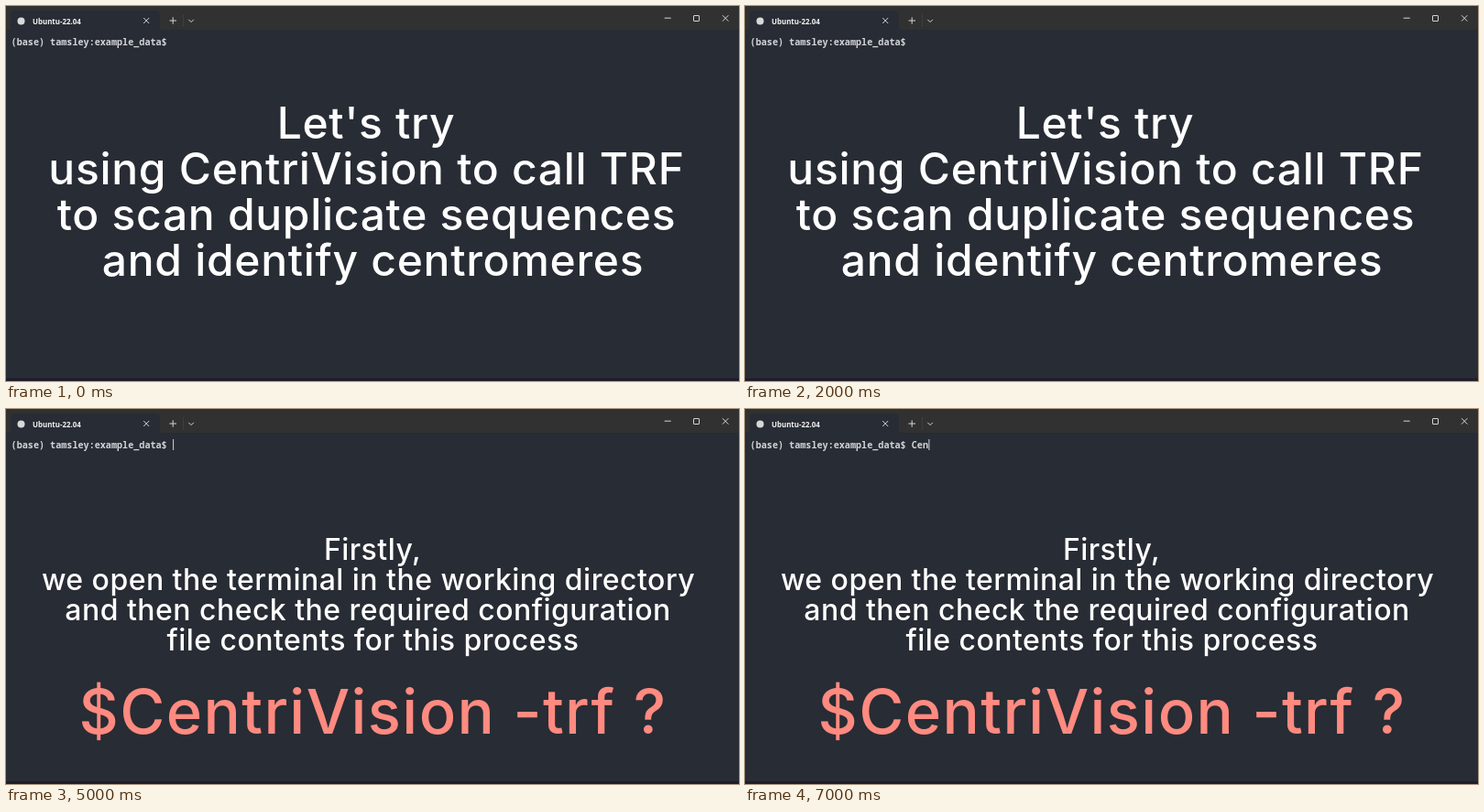
Animation of 800x410 px, one loop 8000 ms. Source, as an HTML page:

```html
<!DOCTYPE html>
<html lang="en">
<head>
<meta charset="utf-8">
<title>Terminal walkthrough</title>
<style>
  html, body { margin: 0; width: 100%; height: 100%; overflow: hidden; background: #282c34; }
  svg { display: block; width: 100%; height: 100%; }
  .caption {
    font-family: Inter, sans-serif;
    font-weight: 500;
    letter-spacing: .0145em;
    text-anchor: middle;
    fill: #fff;
  }
  .shell { font: 600 10.15px "Noto Sans Mono", monospace; fill: #d2d4d8; white-space: pre; }
  .tab { font: 700 7.9px "Open Sans", sans-serif; fill: #f2f2f2; }
  .icons { fill: none; stroke: #d4d4d4; stroke-width: 1; }
</style>
</head>
<body>
<svg viewBox="0 0 800 410" xmlns="http://www.w3.org/2000/svg">
  <rect width="800" height="410" fill="#282c34"/>
  <rect y="407" width="800" height="3" fill="#211d2c"/>
  <rect width="800" height="26" fill="#313131"/>
  <path d="M2 26Q5 26 5 23V10Q5 5 10 5H163Q168 5 168 10V23Q168 26 171 26Z" fill="#282c34"/>
  <circle cx="16.5" cy="16.5" r="4" fill="#d8d8d8"/>
  <text class="tab" x="29" y="19.6">Ubuntu-22.04</text>
  <g class="icons">
    <path d="M150.2 13l6 6m0-6l-6 6"/>
    <path d="M178.5 16h7.5M182.2 12.3v7.4"/>
    <path d="M193.5 9v14" stroke="#3e3e3e"/>
    <path d="M199.3 14.8l2.8 2.8 2.8-2.8"/>
    <path d="M718.7 13.2h7"/>
    <rect x="750.5" y="10.5" width="6" height="6" rx=".5"/>
    <path d="M782 10.2l6.4 6.4m0-6.4l-6.4 6.4"/>
  </g>
  <text id="line" class="shell" x="5.6" y="42.6"></text>
  <rect id="cursor" y="33" width="1" height="12" fill="#d2d4d8"/>
  <g id="intro" class="caption" font-size="48"></g>
  <g id="step" class="caption" font-size="32"></g>
</svg>
<script>
const $ = id => document.getElementById(id);
const LOOP = 8000, CELL = 6.09;
const PROMPT = "(base) tamsley:example_data$ ";

function addLine(group, text, x, y, style = {}) {
  const el = document.createElementNS("http://www.w3.org/2000/svg", "text");
  el.setAttribute("x", x);
  el.setAttribute("y", y);
  el.textContent = text;
  Object.assign(el.style, style);
  group.append(el);
}

function addBlock(group, top, leading, lines) {
  lines.forEach(([text, x], i) => addLine(group, text, x, top + i * leading));
}

addBlock($("intro"), 145, 50, [
  ["Let's try", 393],
  ["using CentriVision to call TRF", 393.5],
  ["to scan duplicate sequences", 393.5],
  ["and identify centromeres", 400.5]
]);
addBlock($("step"), 165.3, 33, [
  ["Firstly,", 400],
  ["we open the terminal in the working directory", 395.5],
  ["and then check the required configuration", 395],
  ["file contents for this process", 400.5]
]);
addLine($("step"), "$CentriVision -trf ?", 400.5, 355.2, {
  fontSize: "67px", letterSpacing: ".021em", fill: "#ff8a80"
});

function show(el, on) {
  el.style.display = on ? "" : "none";
}

function draw(t) {
  const typed = t >= 7000 ? "Cen" : "";
  $("line").textContent = PROMPT + typed;
  $("cursor").setAttribute("x", 5.5 + CELL * (PROMPT.length + typed.length));
  show($("cursor"), t >= 5000);
  show($("intro"), t < 4000);
  show($("step"), t >= 5000);
}

const start = performance.now();
function tick() {
  draw((performance.now() - start) % LOOP);
  requestAnimationFrame(tick);
}
tick();
</script>
</body>
</html>
```
